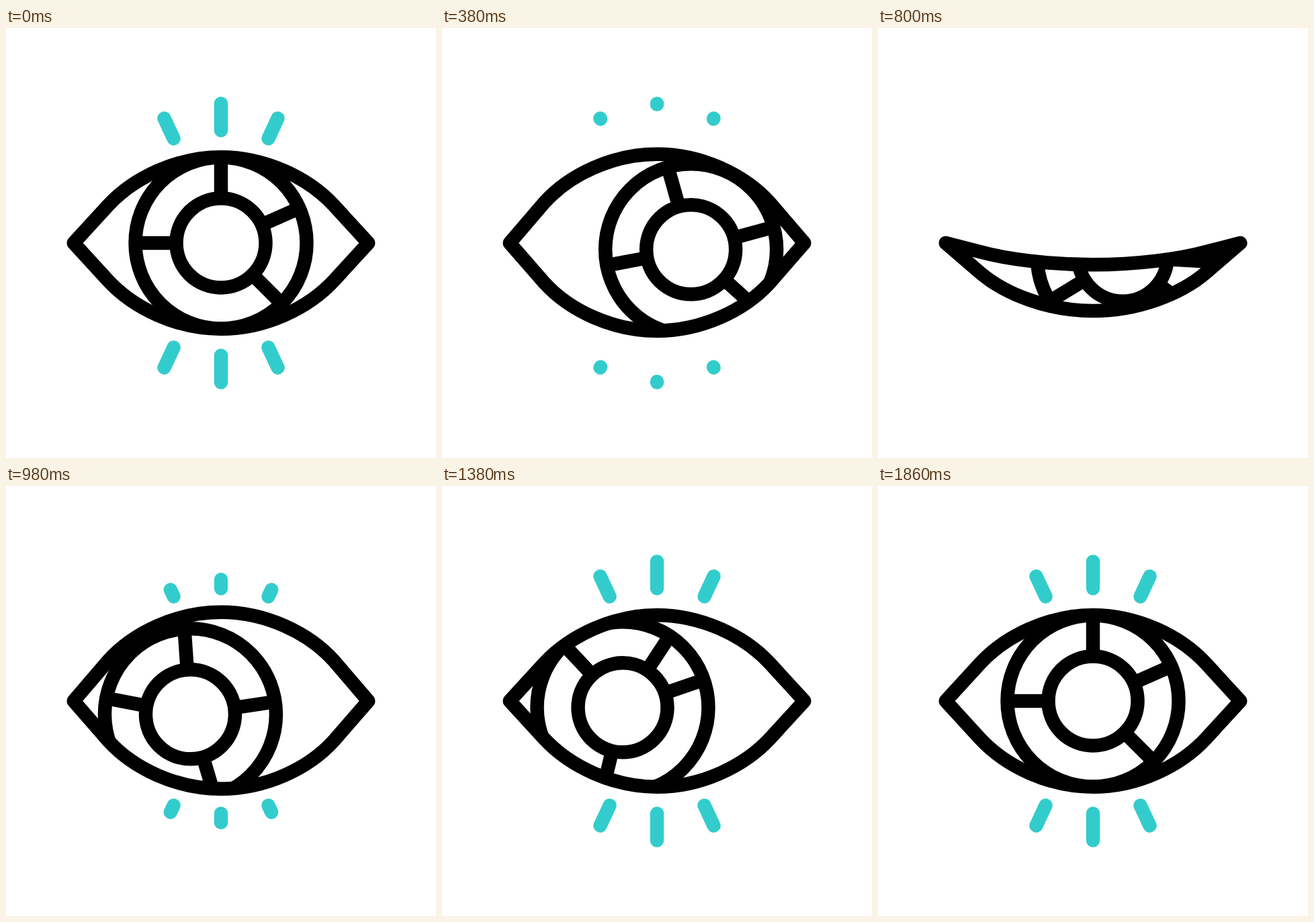
Recreate the animation shown at these times as an HTML page. Size 640x640 px, loop 2.2 s.

```html
<!DOCTYPE html>
<html lang="en">
<head>
<meta charset="utf-8">
<title>Blinking eye</title>
<style>
  html, body { margin: 0; width: 100%; height: 100%; overflow: hidden; background: #fff; }
  svg { display: block; width: 100%; height: 100%; }
  svg * { fill: none; stroke: #000; stroke-width: 20.5; }
  #rays line { stroke: #33cccc; stroke-linecap: round; }
  #lids { stroke-linejoin: round; }
</style>
</head>
<body>
<svg viewBox="0 0 640 640">
  <clipPath id="opening"><path id="hole"/></clipPath>
  <g id="rays"></g>
  <g clip-path="url(#opening)">
    <g id="iris">
      <circle r="127.5"/>
      <circle r="66.5"/>
    </g>
  </g>
  <path id="lids"/>
</svg>
<script>
const LOOP = 2200;
const $ = id => document.getElementById(id);

function add(parent, attrs) {
  const line = document.createElementNS('http://www.w3.org/2000/svg', 'line');
  return set(parent.appendChild(line), attrs);
}
function set(el, attrs) {
  for (const k in attrs) el.setAttribute(k, attrs[k]);
  return el;
}

const mix = (a, b, p) => a + (b - a) * p;
const mixAll = (a, b, p) => a.map((v, i) => mix(v, b[i], p));
const span = (t, from, to) => Math.min(1, Math.max(0, (t - from) / (to - from)));
const smooth = u => u * u * (3 - 2 * u);

// Ease with flat ends; x1 and x2 are the handles in time
function ease(x1, x2) {
  return u => {
    let lo = 0, hi = 1;
    for (let i = 0; i < 24; i++) {
      const s = (lo + hi) / 2, r = 1 - s;
      if (3 * r * r * s * x1 + 3 * r * s * s * x2 + s * s * s < u) lo = s;
      else hi = s;
    }
    return smooth((lo + hi) / 2);
  };
}
const soft = ease(.33, .33), settle = ease(.33, .2);

// Heights of the upper lid (knee, handle, middle), then the lower lid
const REST = [264, 223, 192.2, 376, 417, 447.8];
const WIDE = [260, 218, 187.7, 379, 421, 450.7];
const SHUT = [359, 388, 410.5, 359, 388, 410.5];
const LID_KEYS = [
  [200, REST], [400, WIDE], [645, SHUT], [718, SHUT], [966, WIDE], [1160, REST]
];

function lidPose(t) {
  let [t0, pose] = LID_KEYS[0];
  for (const [t1, next] of LID_KEYS.slice(1)) {
    pose = mixAll(pose, next, smooth(span(t, t0, t1)));
    t0 = t1;
  }
  return pose;
}

function lidPath([k, h, m, K, H, M]) {
  return `M100.7 320L152 ${k}C190 ${h} 254 ${m} 320 ${m}S450 ${h} 488 ${k}L539.3 320` +
         `L488 ${K}C450 ${H} 386 ${M} 320 ${M}S190 ${H} 152 ${K}Z`;
}

// Iris travels right, swings under to the left, then returns
const REACH = 70, DROP = 10, SAG = 17;

function irisOffset(t) {
  const side = f => [f * REACH, DROP * (1 - (1 - Math.abs(f)) ** 3)];
  if (t < 600) return side(smooth(span(t, 200, 477)));
  if (t < 1200) {
    const f = 1 - 2 * smooth(span(t, 694, 1085));
    return [f * REACH, DROP + SAG * (1 - f * f)];
  }
  return side(smooth(span(t, 1237, 1658)) - 1);
}

// Spoke angles: top, right, lower right, left
const SPOKES = [-90, -24, 45, 180];
const LOOK_RIGHT = [-50, 28, -9.5, -34];
const LOOK_LEFT = [34, 5.2, 60, 48];
const STILL = [0, 0, 0, 0];

function spokeTurns(t) {
  let turn = mixAll(STILL, LOOK_RIGHT, soft(span(t, 237, 745)));
  turn = mixAll(turn, LOOK_LEFT, soft(span(t, 745, 1340)));
  return mixAll(turn, STILL, settle(span(t, 1340, 1862)));
}

const spokes = SPOKES.map(() => add($('iris'), { x1: 66, x2: 127 }));

// Each ray runs from its outer end to its inner end
const rays = [];
for (const [x1, y1, x2, y2] of [
  [235.5, 134.5, 249.5, 164.5], [320, 112.5, 320, 152.5], [404.5, 134.5, 390.5, 164.5]
]) {
  for (const flip of [y => y, y => 640 - y]) {
    rays.push({ line: add($('rays'), {}), outer: [x1, flip(y1)], inner: [x2, flip(y2)] });
  }
}

function drawRays(t) {
  const leaving = t < 650;
  const p = leaving ? 1 - smooth(span(t, 200, 402)) : smooth(span(t, 900, 1109));
  $('rays').style.display = p > .002 ? '' : 'none';
  for (const { line, outer, inner } of rays) {
    const [a, b] = leaving ? [outer, inner] : [inner, outer];
    const [x2, y2] = mixAll(a, b, p);
    set(line, { x1: a[0], y1: a[1], x2, y2 });
  }
}

function draw(t) {
  const d = lidPath(lidPose(t));
  set($('lids'), { d });
  set($('hole'), { d });
  const [x, y] = irisOffset(t);
  set($('iris'), { transform: `translate(${320 + x} ${320 + y})` });
  const turns = spokeTurns(t);
  spokes.forEach((el, i) => set(el, { transform: `rotate(${SPOKES[i] + turns[i]})` }));
  drawRays(t);
}

const start = performance.now();
function tick() {
  draw((performance.now() - start) % LOOP);
  requestAnimationFrame(tick);
}
tick();
</script>
</body>
</html>
```
